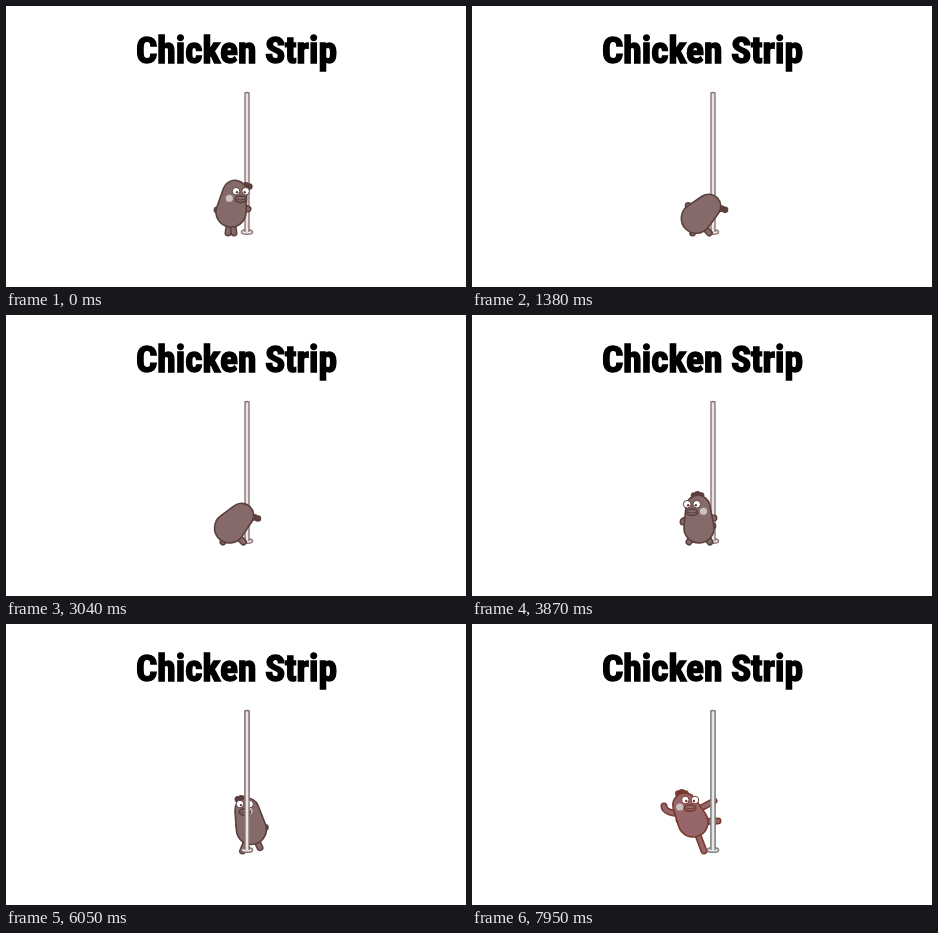
An HTML page that plays this animation: 460 by 281 pixels, repeating every 8 s.

```html
<!DOCTYPE html>
<html lang="en">
<head>
<meta charset="utf-8">
<title>Chicken Strip</title>
<style>
  html, body { margin: 0; width: 100%; height: 100%; overflow: hidden; background: #fff; }
  svg { display: block; width: 100%; height: 100%; }
  #title {
    font: 900 37.5px "Roboto Condensed", "Open Sans Condensed", Roboto, "Noto Sans", "Open Sans", sans-serif;
    font-stretch: 75%;
    stroke: #000; stroke-width: 1.4;
  }
  #stage { --skin: #846b6a; --line: #5b3f3d; --rim: #8a7473; }
  #stage.warm { --skin: #97666a; --line: #78392f; --rim: #848484; }
  .skin { fill: var(--skin); stroke: var(--line); stroke-width: 1.6; }
  .outer, .inner { fill: none; stroke-linecap: round; }
  .outer { stroke: var(--line); stroke-width: 7; }
  .inner { stroke: var(--skin); stroke-width: 4; }
  .mouth { fill: none; stroke: var(--line); }
  .eye { fill: #fff; stroke: var(--line); }
  .dark { fill: var(--line); }
  .cheek { fill: #c9c2bf; }
  .pole { fill: #e9e6e6; stroke: var(--rim); stroke-width: 1.4; }
</style>
</head>
<body>
<svg id="stage" viewBox="0 0 460 281">
  <text id="title" x="130" y="57">Chicken Strip</text>
  <g id="pole">
    <ellipse class="pole" cx="241" cy="226" rx="5.6" ry="2.2"/>
    <path class="pole" d="M239 226V87q2-1 4 0V226"/>
  </g>
  <g id="chicken"></g>
  <use id="poleFront" href="#pole"/>
</svg>
<script>
const LOOP = 8000, WARM_FROM = 7950, STEP = 70, POLE_X = 242, FLOOR = 227;
const HEAD_R = 12, BELLY_R = 15;
const byId = id => document.getElementById(id);

// hip: belly centre; lean: body angle; turn, nod: where the face points;
// grip: height of the hand on the pole; hand: free hand from the hip;
// feet: their x; kick: lift of the second foot.
const rest = { lean: 0, turn: -1, nod: 0, grip: 203, hand: [0, -6], kick: 0 };
const bow = { ...rest, hip: [221, 213], lean: 78, turn: 0, nod: 12, feet: [217, 237] };
const swing = { hip: [221, 198], lean: -26, turn: .9, nod: 0, grip: 177, hand: [-29, -16],
  feet: [232, 246], kick: 30 };
const timeline = [
  { ...rest, t: 0, hip: [225, 206], lean: 11, turn: 1, nod: 4, feet: [222, 228] },
  { ...rest, t: 680, hip: [230, 211], lean: -9, hand: [-22, -24], feet: [227, 238] },
  { ...bow, t: 1870 },
  { ...bow, t: 2270 },
  { ...rest, t: 3870, hip: [227, 213], lean: -3, nod: 2, hand: [-16, -6], feet: [217, 238] },
  { ...rest, t: 5100, hip: [253, 204], turn: -.7, nod: 2, grip: 178, feet: [238, 254] },
  { ...rest, t: 6960, hip: [237, 207], lean: -27, turn: 0, nod: -4, grip: 178,
    hand: [-27, -2], feet: [235, 254], kick: 7 },
  { ...swing, t: 7800 },
  { ...swing, t: LOOP }
];

const mix = (a, b, k) => Array.isArray(a) ? a.map((v, i) => mix(v, b[i], k)) : a + (b - a) * k;

function poseAt(t) {
  const i = timeline.findIndex(key => key.t > t);
  const a = timeline[i - 1], b = timeline[i];
  const u = (t - a.t) / (b.t - a.t), k = u * u * (3 - 2 * u);
  return Object.fromEntries(Object.keys(a).map(name => [name, mix(a[name], b[name], k)]));
}

// Point at distance r from (x, y), degrees clockwise from straight up.
function polar([x, y], r, degrees) {
  const a = degrees * Math.PI / 180;
  return [x + r * Math.sin(a), y - r * Math.cos(a)];
}

const circle = (cls, [x, y], r) => `<circle class="${cls}" cx="${x}" cy="${y}" r="${r}"/>`;

function limb(from, bend, to) {
  const d = `M${from}Q${bend} ${to}`;
  return `<path class="outer" d="${d}"/><path class="inner" d="${d}"/>`;
}

// Pear outline: two circles joined by their common tangents.
function pear(head, hip, lean, reach) {
  const open = Math.acos((BELLY_R - HEAD_R) / reach) * 180 / Math.PI;
  const left = lean - open, right = lean + open;
  return `<path class="skin" d="M${polar(head, HEAD_R, left)}` +
    `A${HEAD_R} ${HEAD_R} 0 0 1 ${polar(head, HEAD_R, right)}` +
    `L${polar(hip, BELLY_R, right)}` +
    `A${BELLY_R} ${BELLY_R} 0 1 1 ${polar(hip, BELLY_R, left)}Z"/>`;
}

function face([hx, hy], turn, nod) {
  const x = hx + 6 * turn, y = hy + nod - 5;
  const eyes = [-4.8, 4.8].map(dx =>
    circle('eye', [x + dx, y], 3.8) + circle('dark', [x + dx * .8, y + 1], 1.2));
  return circle('cheek', [x - 11.5 * turn, y + 7], 3.6) + eyes.join('') +
    `<ellipse class="skin" cx="${x}" cy="${y + 8}" rx="5.6" ry="3.2"/>` +
    `<path class="mouth" d="M${x - 4.5} ${y + 8}q4.5 1.5 9 0"/>`;
}

function drawChicken({ hip, lean, turn, nod, grip, hand, feet, kick }) {
  const reach = 21 - Math.abs(lean) * .08;
  const head = polar(hip, reach, lean);
  const chest = mix(hip, head, .45);
  const free = [hip[0] + hand[0], hip[1] + hand[1]];
  const comb = polar(head, HEAD_R + 1, lean + 15 * turn + 8 * nod);
  const legs = feet.map((x, i) => {
    const foot = [x, FLOOR - i * kick];
    return limb(hip, mix(hip, foot, .5), foot);
  });
  return legs.join('') +
    limb(chest, mix(chest, [POLE_X, grip], .5), [POLE_X, grip]) +
    limb(chest, [free[0], chest[1]], free) +
    circle('skin', [hip[0] - Math.sign(turn || 1) * 14, hip[1] - 2], 2.6) +
    [-3.5, 0, 3.5].map(dx => circle('dark', [comb[0] + dx, comb[1] + Math.abs(dx) / 3], 3.3)).join('') +
    pear(head, hip, lean, reach) +
    (nod < 7 ? face(head, turn, nod) : '');
}

function draw(now) {
  const t = now % LOOP;
  const drawn = Math.max(0, 50 + Math.floor((t - 50) / STEP) * STEP);
  byId('stage').classList.toggle('warm', t >= WARM_FROM);
  byId('poleFront').style.display = t > 4500 ? '' : 'none';
  byId('chicken').innerHTML = drawChicken(poseAt(drawn));
}

// Space the letters so that any installed face keeps the title's measure.
const title = byId('title');
title.style.letterSpacing = (201 - title.getComputedTextLength()) / 12 + 'px';

function tick() {
  draw(performance.now());
  requestAnimationFrame(tick);
}
tick();
</script>
</body>
</html>
```
